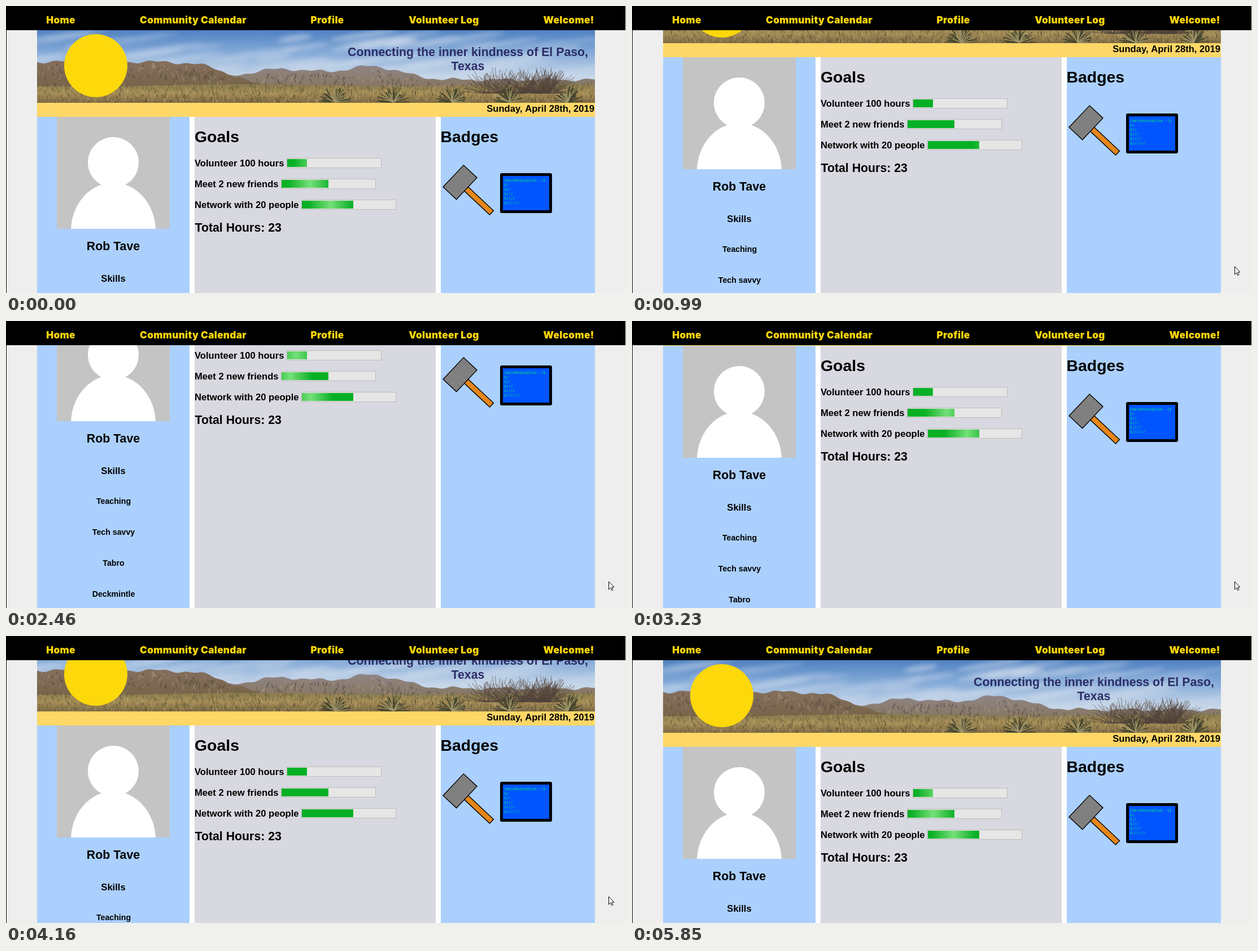
These frames come from a looping animation (1098x510 px, 5.93 s). An HTML page with a canvas:

```html
<!DOCTYPE html>
<html lang="en">
<head>
<meta charset="utf-8">
<title>Volunteer profile</title>
<style>
html, body { margin: 0; width: 100%; height: 100%; overflow: hidden; background: #eee; }
canvas { display: block; }
</style>
</head>
<body>
<canvas id="stage" width="1098" height="510"></canvas>
<script>
const W = 1098, H = 510, LOOP = 5930;
const LEFT = 55, RIGHT = 1043, NAV = 43, COLUMNS = 197, BOTTOM = 900;
const ctx = document.getElementById('stage').getContext('2d');

// Heading sizes at the page's zoom level
const ZOOM = 0.888;
const H1 = 32 * ZOOM, H2 = 24 * ZOOM, H3 = 18.72 * ZOOM, BODY = 16 * ZOOM;

// Page scroll: [time in ms, offset in px]
const SCROLL = [
  [650, 0], [990, 106], [1300, 193], [1500, 193], [1690, 205], [2100, 218],
  [2700, 218], [3300, 145], [3840, 121], [4240, 17], [4440, 17], [4620, 8], [4780, 0]
];

function along(keys, t) {
  let i = 1;
  while (i < keys.length - 1 && keys[i][0] < t) i++;
  const [t0, a] = keys[i - 1], [t1, b] = keys[i];
  return a + (b - a) * Math.min(1, Math.max(0, (t - t0) / (t1 - t0)));
}

function seeded(n) {
  return () => (n = (n * 16807) % 2147483647) / 2147483647;
}

function rect(c, color, x, y, w, h) {
  c.fillStyle = color;
  c.fillRect(x, y, w, h);
}

function oval(c, color, x, y, rx, ry = rx, turn = 0) {
  c.beginPath();
  c.ellipse(x, y, rx, ry, turn, 0, 2 * Math.PI);
  c.fillStyle = color;
  c.fill();
}

function stroke(c, color, width, x, y, dx, dy) {
  c.strokeStyle = color;
  c.lineWidth = width;
  c.beginPath();
  c.moveTo(x, y);
  c.lineTo(x + dx, y + dy);
  c.stroke();
}

function ramp(c, y0, y1, ...colors) {
  const g = c.createLinearGradient(0, y0, 0, y1);
  colors.forEach((color, i) => g.addColorStop(i / (colors.length - 1), color));
  return g;
}

function text(str, x, y, size, align = 'left', color = '#000') {
  ctx.font = `bold ${size}px "Liberation Sans", Arial, sans-serif`;
  ctx.textAlign = align;
  ctx.fillStyle = color;
  ctx.fillText(str, x, y);
}

// Ridge lines of the landscape
const hill = (x, at, w, h) => h * Math.exp(-(((x - at) / w) ** 2));
const rough = x => 2 * Math.sin(x / 13) + 1.2 * Math.sin(x / 5.3);
const farRidge = x => 131 - hill(x, 490, 90, 19) - hill(x, 650, 70, 23) + rough(x);
const nearRidge = x => 146 - 47 / (1 + Math.exp((x - 400) / 28)) + rough(x + 40);
const plain = x => 141 + 2 * Math.sin(x / 90);

function paintBanner() {
  const cv = document.createElement('canvas');
  cv.width = RIGHT - LEFT;
  cv.height = 129;
  const c = cv.getContext('2d'), rnd = seeded(77);
  const anyX = () => LEFT + rnd() * (RIGHT - LEFT);
  c.translate(-LEFT, -NAV);

  rect(c, ramp(c, 43, 125, '#4f81c2', '#86acd9', '#c6d6e8'), LEFT, NAV, 988, 129);
  c.filter = 'blur(4px)';
  for (let i = 0; i < 45; i++) {
    oval(c, `rgba(224,231,241,${0.2 + rnd() * 0.35})`,
      anyX(), 50 + rnd() * 62, 30 + rnd() * 60, 2 + rnd() * 5, -0.15);
  }
  c.filter = 'none';

  const land = (ridge, fill) => {
    c.beginPath();
    c.moveTo(LEFT, 172);
    for (let x = LEFT; x <= RIGHT; x += 2) c.lineTo(x, ridge(x));
    c.lineTo(RIGHT, 172);
    c.fillStyle = fill;
    c.fill();
  };
  const cracks = (ridge, n) => {
    for (let i = 0; i < n; i++) {
      const x = anyX(), y = ridge(x) + 3 + rnd() * 24;
      stroke(c, rnd() < 0.6 ? 'rgba(62,52,50,.35)' : 'rgba(190,168,150,.3)',
        1 + rnd() * 2, x, y, rnd() * 10 - 5, 3 + rnd() * 7);
    }
  };
  land(farRidge, ramp(c, 105, 148, '#8f8585', '#86765f'));
  cracks(farRidge, 320);
  land(nearRidge, ramp(c, 95, 148, '#85705f', '#756347'));
  cracks(x => Math.min(nearRidge(x), 138), 320);

  land(plain, ramp(c, 138, 172, '#857a4e', '#a48d56', '#7c6945'));
  for (let i = 0; i < 1400; i++) {
    stroke(c, rnd() < 0.55 ? 'rgba(56,50,34,.45)' : 'rgba(204,178,118,.45)',
      1, anyX(), 143 + rnd() * 32, rnd() * 6 - 3, -3 - rnd() * 5);
  }

  const spikes = (x, y, r, n, color) => {
    for (let i = 0; i < n; i++) {
      const a = Math.PI * (1 + rnd()), len = r * (0.6 + rnd() * 0.4);
      stroke(c, color, 1 + rnd() * 0.6, x, y, Math.cos(a) * len, Math.sin(a) * len);
    }
  };
  for (let i = 0; i < 26; i++) spikes(845 + rnd() * 130, 155, 48, 12, 'rgba(82,68,60,.4)');
  for (let x = 583; x < RIGHT; x += 103) {
    spikes(x, 171, 30, 34, '#45452f');
    spikes(x, 171, 24, 12, '#a0966a');
  }
  return cv;
}
const banner = paintBanner();

function drawHeader() {
  ctx.drawImage(banner, LEFT, NAV);
  oval(ctx, '#fdd80b', 159, 106, 56);
  ['Connecting the inner kindness of El Paso,', 'Texas'].forEach((line, i) =>
    text(line, 818, 89 + i * 25, H2, 'center', '#2c2d66'));
  rect(ctx, '#fed766', LEFT, 172, 988, 25);
  text('Sunday, April 28th, 2019', 1042, 188, H3, 'right');
}

function drawProfile() {
  rect(ctx, '#abd0fe', LEFT, COLUMNS, 270, BOTTOM);
  rect(ctx, '#c4c4c4', 90, COLUMNS, 200, 199);
  ctx.save();
  ctx.beginPath();
  ctx.rect(90, COLUMNS, 200, 199);
  ctx.clip();
  oval(ctx, '#fff', 190, 278, 45);
  oval(ctx, '#fff', 190, 400, 75, 86);
  ctx.restore();
  text('Rob Tave', 190, 434, H2, 'center');
  text('Skills', 190, 490, H3, 'center');
  ['Teaching', 'Tech savvy', 'Tabro', 'Deckmintle'].forEach((skill, i) =>
    text(skill, 190.5, 542.5 + i * 55, BODY, 'center'));
}

// A progress bar with a light pulse that sweeps across twice per loop
function bar(x, y, share, t) {
  rect(ctx, '#bcbcbc', x, y, 168, 18);
  rect(ctx, '#e6e6e6', x + 1, y + 1, 166, 16);
  const mid = x + 1 + ((t + 1294) % (LOOP / 2)) * 0.07 - 40;
  const g = ctx.createLinearGradient(mid - 40, 0, mid + 40, 0);
  ['#06b025', '#3fc64c', '#74e07a', '#3fc64c', '#06b025'].forEach((color, i) =>
    g.addColorStop(i / 4, color));
  rect(ctx, g, x + 1, y + 2, Math.round(165 * share), 14);
}

function drawGoals(t) {
  rect(ctx, '#d8d8e0', 334, COLUMNS, 427, BOTTOM);
  text('Goals', 334, 242, H1);
  [['Volunteer 100 hours', 497, 0.21], ['Meet 2 new friends', 487, 0.5],
    ['Network with 20 people', 523, 0.55]].forEach(([goal, x, share], i) => {
    text(goal, 334, 285 + i * 37, H3);
    bar(x, 270 + i * 37, share, t);
  });
  text('Total Hours: 23', 334.5, 401, H2);
}

function drawHammer() {
  ctx.save();
  ctx.translate(803.5, 313.5);
  ctx.rotate(0.755);
  ctx.strokeStyle = '#000';
  ctx.lineWidth = 1.4;
  const part = (color, x, y, w, h) => {
    rect(ctx, color, x, y, w, h);
    ctx.strokeRect(x, y, w, h);
  };
  part('#e6861a', 10, -4.5, 68, 10);
  part('#808080', -16, -27, 32.5, 53);
  ctx.restore();
}

function drawTerminal() {
  ctx.beginPath();
  ctx.roundRect(875, 297, 92, 71, 3);
  ctx.fillStyle = '#000';
  ctx.fill();
  rect(ctx, '#0055ff', 880, 302, 82, 61);
  ctx.font = '6.45px "DejaVu Sans Mono", monospace';
  ctx.textAlign = 'left';
  ctx.fillStyle = '#00e878';
  ctx.fillText('[WarmDeeds@Code ~]$', 882, 312);
  [1, 2, 3, 4, 6].forEach((n, i) => ctx.fillText('$' + '/'.repeat(n), 882, 320 + i * 8));
}

function drawBadges() {
  rect(ctx, '#abd0fe', 770, COLUMNS, 273, BOTTOM);
  text('Badges', 769.5, 242, H1);
  drawHammer();
  drawTerminal();
}

function drawNav() {
  rect(ctx, '#000', 0, 0, 1, H);
  rect(ctx, '#000', 0, 0, W - 1, NAV);
  ctx.save();
  ctx.font = '900 17.2px Inter, sans-serif';
  ctx.letterSpacing = '0.3px';
  ctx.textAlign = 'center';
  ctx.fillStyle = '#ffd70a';
  [['Home', 97], ['Community Calendar', 331.5], ['Profile', 569], ['Volunteer Log', 775.5],
    ['Welcome!', 996.5]].forEach(([label, x]) => ctx.fillText(label, x, 31));
  ctx.restore();
}

// The pointer appears early on and slips out below at the end
function drawCursor(t) {
  if (t < 150) return;
  const out = Math.max(0, (t - 5660) / 190);
  ctx.save();
  ctx.translate(1067.5 + 10 * out, 463 + 47 * out);
  ctx.fillStyle = '#fff';
  ctx.strokeStyle = '#000';
  ctx.lineWidth = 1;
  ctx.lineJoin = 'round';
  const arrow = new Path2D('M0 0V14L3.2 11 5.2 15.6 7.3 14.7 5.3 10.2 9.4 10Z');
  ctx.fill(arrow);
  ctx.stroke(arrow);
  ctx.restore();
}

function draw(t) {
  rect(ctx, '#eee', 0, 0, W, H);
  ctx.save();
  ctx.translate(0, -Math.round(along(SCROLL, t)));
  rect(ctx, '#fff', LEFT, NAV, 988, BOTTOM);
  drawHeader();
  drawProfile();
  drawGoals(t);
  drawBadges();
  ctx.restore();
  drawNav();
  drawCursor(t);
}

const start = performance.now();
function tick() {
  draw((performance.now() - start) % LOOP);
  requestAnimationFrame(tick);
}
tick();
</script>
</body>
</html>
```
